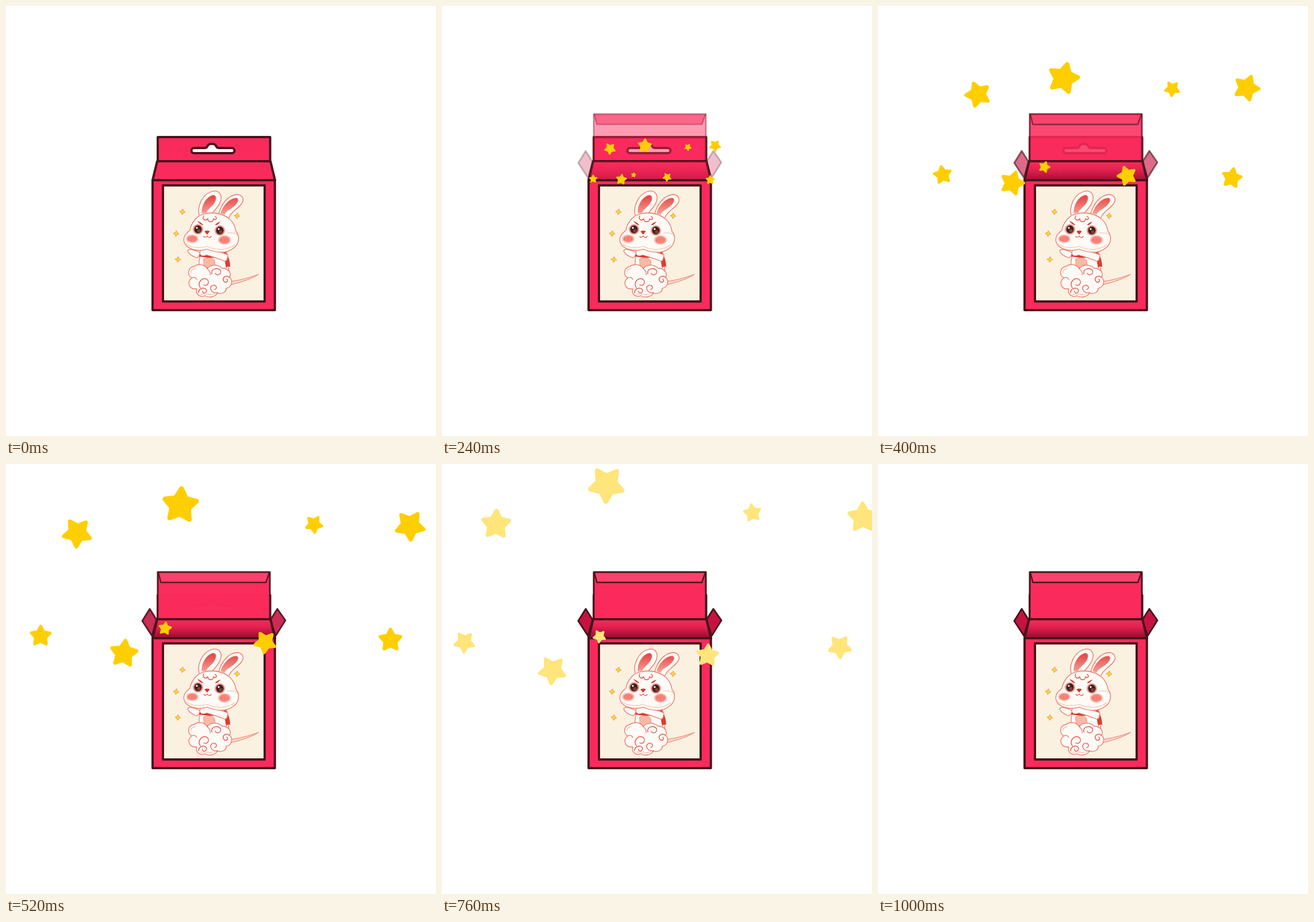
Write an HTML page with a canvas that moves like this. It is 748 px wide and 748 px high and loops after 1120 ms.

```html
<!DOCTYPE html>
<html lang="en">
<head>
<meta charset="utf-8">
<title>Gift box</title>
<style>
html, body { margin: 0; width: 100%; height: 100%; overflow: hidden; background: #fff; }
canvas { display: block; width: 748px; height: 748px; }
</style>
</head>
<body>
<canvas id="stage" width="748" height="748"></canvas>
<script>
const ctx = document.getElementById('stage').getContext('2d');
const LOOP = 1120, STEP = 40;
const RED = '#fa2b5c', DARK = '#47151b', GOLD = '#ffce00';
const LINE = '#ee7565', SKIN = '#fefbf7';

// Smooth curve through (k, v) points
function curve(k, v) {
  const last = k.length - 1;
  const slope = i => {
    const a = Math.max(0, i - 1), b = Math.min(last, i + 1);
    return (v[b] - v[a]) / (k[b] - k[a]);
  };
  return t => {
    if (t <= k[0]) return v[0];
    if (t >= k[last]) return v[last];
    let i = 0;
    while (t >= k[i + 1]) i++;
    const h = k[i + 1] - k[i], u = (t - k[i]) / h, w = 1 - u;
    return v[i] * (1 + 2 * u) * w * w + slope(i) * h * u * w * w
      + v[i + 1] * u * u * (3 - 2 * u) - slope(i + 1) * h * u * u * w;
  };
}

const KEYS = [160, 320, 400, 520, 760, 1000];
const travel = curve(KEYS, [0, .475, .735, .917, 1, 1.022]);
const bend = curve(KEYS, [0, .83, 1, .68, 0, -.17]);
const spin = curve(KEYS, [-300, -133, -61, 0, 34, 46]);

// start x, y, end x, y, bend x, y, radius, angle, spin direction
const STARS = [
  [346, 293, 94, 105, 13, -1, 27, 40, 1],
  [364, 295, 286, 36, 16, 21, 33, 4, 1],
  [386, 293, 540, 85, 12.5, 4, 16.5, 30, 1],
  [397, 291, 732, 93, -2, -3, 27.5, 33, -1],
  [335, 307, 39, 310, -5, -15.5, 19.5, 1, -1],
  [349, 305, 192, 359, 0, -36.7, 25.5, 7, 1],
  [355, 304, 274, 300, -6, -21, 12, 8, 1],
  [373, 304, 462, 333, -5.4, -30, 20.5, 42, 1],
  [396, 307, 692, 318, 2, -16, 21.5, 0, 1]
];

function paint(path, fill, stroke, width) {
  if (typeof path === 'string') path = new Path2D(path);
  if (fill) { ctx.fillStyle = fill; ctx.fill(path); }
  if (stroke) { ctx.strokeStyle = stroke; ctx.lineWidth = width; ctx.stroke(path); }
}

function fade(c0, c1, y0, y1) {
  const g = ctx.createLinearGradient(0, y0, 0, y1);
  g.addColorStop(0, c0);
  g.addColorStop(1, c1);
  return g;
}

function oval(x, y, rx, ry, color) {
  ctx.beginPath();
  ctx.ellipse(x, y, rx, ry, 0, 0, 7);
  ctx.fillStyle = color;
  ctx.fill();
}

function blush(x, y, rx, ry, color) {
  ctx.save();
  ctx.translate(x, y);
  ctx.scale(rx, ry);
  const g = ctx.createRadialGradient(0, 0, 0, 0, 0, 1);
  g.addColorStop(0, color);
  g.addColorStop(.6, color);
  g.addColorStop(1, color + '00');
  oval(0, 0, 1, 1, g);
  ctx.restore();
}

function starPath(n, outer, inner) {
  const p = new Path2D();
  for (let i = 0; i < 2 * n; i++) {
    const r = i % 2 ? inner : outer, a = i * Math.PI / n - Math.PI / 2;
    p.lineTo(r * Math.cos(a), r * Math.sin(a));
  }
  p.closePath();
  return p;
}

const STAR = starPath(5, .88, .47), SPARK = starPath(4, 5, 2.6);

function drawSpark(x, y) {
  ctx.save();
  ctx.translate(x, y);
  ctx.rotate(.12);
  paint(SPARK, '#ffd92b', '#e2a06a', 1);
  ctx.restore();
}

function drawEar(outer, inner) {
  paint(outer, SKIN, LINE, 1.3);
  paint(inner, fade('#e4494a', '#f9a79b', 332, 364), '#ee8272', .8);
}

function drawEye(x, y) {
  blush(x, y, 10, 10, '#d9483f');
  oval(x, y, 6.2, 6.8, '#3a2320');
  oval(x + 1.5, y + 2.5, 3, 3, '#7b4238');
  oval(x - 2, y - 2.6, 1.6, 1.6, '#fff');
}

function drawRabbit() {
  // body and scarf
  paint('M340 426L384 428C386 442 386 452 388 462L336 462C335 448 336 436 340 426Z', SKIN, LINE, 1.2);
  paint('M382 428C388 437 390 446 390 454C387 452 385 453 383 456C381 447 380 438 379 429Z', '#e13a30');
  paint('M344 440C352 436 360 438 363 443L364 455L345 456Z', '#f8b9a6', LINE, .8);
  paint('M333 430C344 435 354 435 364 432L362 438C352 438 342 437 333 435Z', '#d8332c');
  // arms
  paint('M316 426C318 421 326 424 338 429C336 434 336 437 332 438C326 436 318 433 316 426Z', SKIN, LINE, 1.2);
  paint('M337 430C338 419 349 415 355 423C366 427 377 429 386 433C385 440 385 443 381 444C368 439 358 436 349 433C344 436 338 435 337 430Z', SKIN, LINE, 1.2);
  // head
  drawEar('M336 364C332 348 342 328 357 323C370 319 377 328 373 340C370 350 362 355 358 362',
    'M341 360C340 347 348 332 360 329C367 329 366 337 362 343C356 351 351 353 348 359Z');
  drawEar('M370 362C374 345 386 329 402 328C413 329 415 338 409 345C402 354 392 357 388 368',
    'M374 360C377 348 388 335 400 334C407 335 403 343 397 348C390 354 383 356 380 362Z');
  paint('M327 374C334 362 352 358 368 361C386 364 398 376 400 392C407 400 406 414 396 421C384 431 366 430 350 423C334 428 315 424 310 411C307 401 314 395 320 390C321 384 323 379 327 374Z', SKIN, LINE, 1.3);
  paint('M314 414C324 422 340 421 350 418C366 426 386 425 398 415M385 395C392 394 398 394 402 398', null, '#f8c3ab', 1.2);
  paint('M344 365C341 371 347 375 351 370C351 377 361 377 361 370C365 374 368 369 364 366', null, '#df5043', 1.4);
  blush(324, 405, 12, 8, '#f78478');
  blush(380, 407, 12.5, 9, '#f78478');
  paint('M318 403l-1 4M324 403l-1 4M330 403l-1 4M375 405l-1 4M381 405l-1 4M387 405l-1 4', null, '#ef6358', .8);
  drawEye(334, 388.5);
  drawEye(372, 390.5);
  paint('M334 375C338 376 340 378 343 381C339 380 336 378 334 375ZM372 376C369 377 366 378 364 381C367 381 370 379 372 376Z', '#d93a32', '#d93a32', .8);
  paint('M346 392Q350 390 354 392L350 397Z', '#d8342f', '#d8342f', 1);
  paint('M344 401Q347 404 350 400Q353 405 357 401', null, '#d8483f', 1.2);
  // cloud
  paint('M439 467C420 474 402 478 384 480L378 488C398 483 422 478 439 467Z', '#fbd9cd', LINE, 1);
  paint('M323 473C314 467 317 455 327 453C334 448 346 449 350 457C356 449 368 449 376 456C386 456 393 464 389 472C396 478 392 490 383 491C384 498 374 502 368 499C364 507 351 508 346 504C336 508 329 500 332 492C320 494 313 482 323 473Z', SKIN, LINE, 1.3);
  paint('M323 473C328 471 331 473 332 476M350 457C354 460 356 464 355 468', null, LINE, 1.2);
  paint('M358 466C356 457 368 454 373 460C376 466 367 471 364 465M389 472C382 467 375 473 379 479C383 483 388 478 384 475', null, '#e6574a', 1.4);
  paint('M338 490C332 481 341 472 349 475C356 480 350 489 344 485M335 499C335 490 347 488 349 495C348 501 341 500 342 496', null, '#e6574a', 1.4);
  paint('M368 499C358 500 352 491 359 486C366 484 369 492 363 493', null, '#e6574a', 1.3);
  paint('M322 464C321 460 325 457 329 457M338 502C346 498 356 505 364 500', null, '#f6bfae', 1.3);
}

function drawBox() {
  paint('M264 228H459.500V270H264Z', RED, DARK, 4);
  paint('M263 270H460L468 303H255Z', RED, DARK, 4);
  paint('M327 247H345Q349 247 350 244.500A8.500 7 0 0 1 366 244.500Q367 247 371 247H393A4.500 4.500 0 0 1 393 256H327A4.500 4.500 0 0 1 327 247Z', '#fff', DARK, 4);
}

function drawBody() {
  paint('M255 303H467.700V529H255Z', RED, DARK, 4);
  paint('M273 312H450V514H273Z', '#fbf1e1', DARK, 4);
  [[307, 358], [402, 365], [296, 396], [299, 441]].forEach(p => drawSpark(...p));
  drawRabbit();
}

function drawOpen(a) {
  const layers = n => 1 - Math.pow(1 - a, n);
  ctx.globalAlpha = layers(2);
  paint('M263 187H460V268H263Z', RED);
  ctx.globalAlpha = layers(3);
  paint('M264 188H459L453 206H269Z', '#fb416d');
  ctx.globalAlpha = a;
  paint('M264 268V188H459V268', null, DARK, 3);
  paint('M265 189L269.500 206H452L458 189', null, DARK, 2.4);
  paint('M250 252L262 271L254 299L237 273Z', '#c61240', DARK, 3);
  paint('M472 252L486 272L469 299L460 271Z', '#c61240', DARK, 3);
  ctx.globalAlpha = layers(2);
  const shade = fade('#f7295a', '#a00c32', 271, 301);
  shade.addColorStop(.4, '#e32251');
  paint('M263 270H460L468 303H255Z', shade, DARK, 4);
  ctx.globalAlpha = 1;
}

// Gold blended with the white page
function tint(a) {
  return `rgb(255,${Math.round(255 - 49 * a)},${Math.round(255 * (1 - a))})`;
}

function drawStars(t) {
  const size = Math.min(1, .14 + (t - 160) * .00306);
  const p = travel(t), b = bend(t), turn = spin(t);
  const color = t > 540 ? tint((1000 - t) / 460) : GOLD;
  for (const [x0, y0, x1, y1, bx, by, r, angle, way] of STARS) {
    ctx.save();
    ctx.translate(x0 + (x1 - x0) * p + bx * b, y0 + (y1 - y0) * p + by * b);
    ctx.rotate((angle + way * turn) * Math.PI / 180);
    ctx.scale(r * size, r * size);
    paint(STAR, color, color, .25);
    ctx.restore();
  }
}

function draw(t) {
  ctx.fillStyle = '#fff';
  ctx.fillRect(0, 0, 748, 748);
  ctx.lineJoin = ctx.lineCap = 'round';
  drawBox();
  if (t >= 160) drawOpen(Math.min(1, (t - 120) / 450));
  drawBody();
  if (t >= 160 && t < 1000) drawStars(t);
}

const start = performance.now();
function tick() {
  let t = Math.floor((performance.now() - start) % LOOP / STEP) * STEP;
  if (t === 680 || t === 800) t -= STEP; // two poses are held longer
  draw(t);
  requestAnimationFrame(tick);
}
tick();
</script>
</body>
</html>
```
